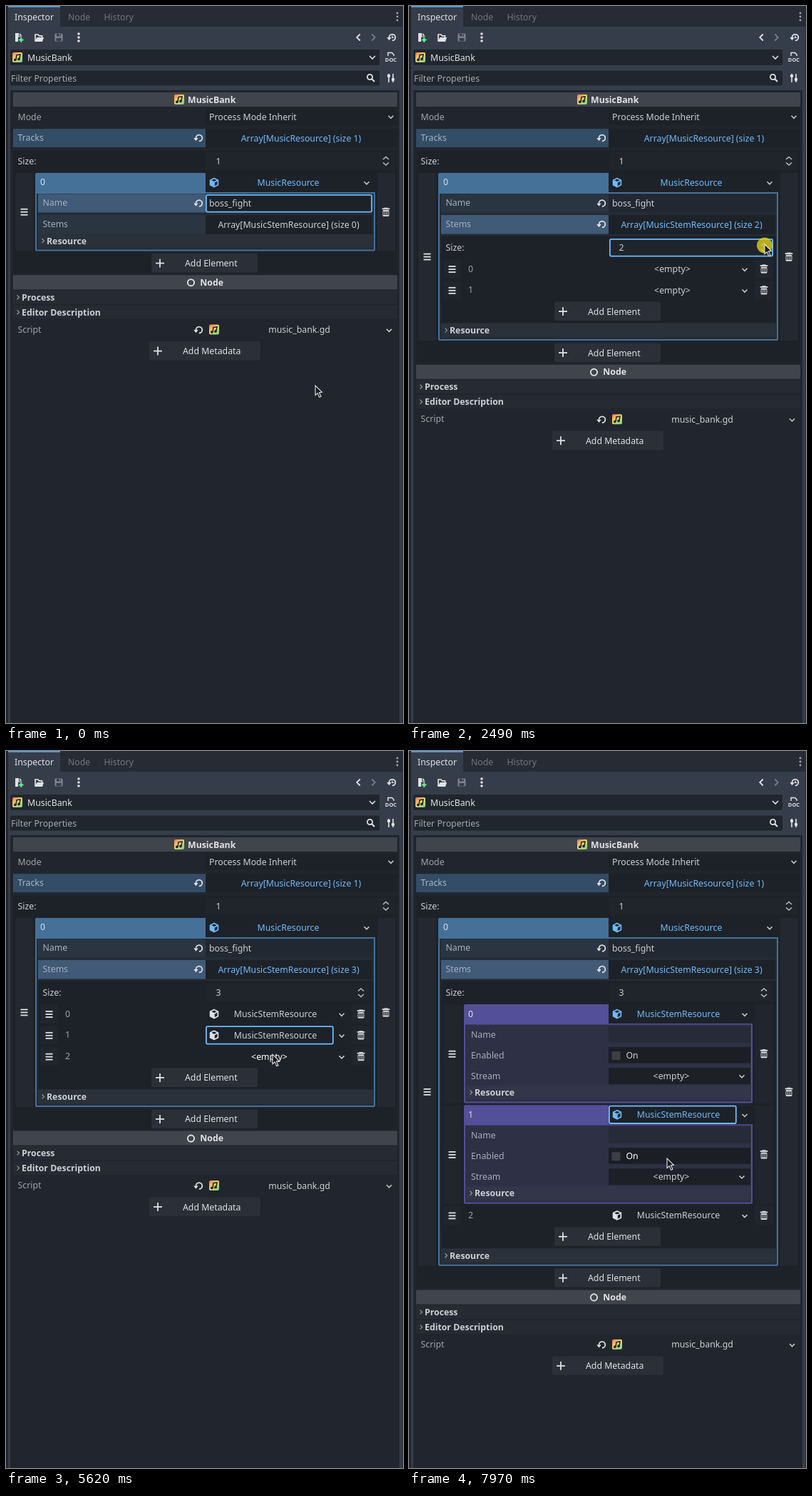
An HTML page with a canvas that plays this animation: 557x1005 px, repeating every 8 s.

```html
<!DOCTYPE html>
<html lang="en">
<head>
<meta charset="utf-8">
<title>Inspector</title>
<style>
html, body { margin: 0; width: 557px; height: 1005px; overflow: hidden; background: #21262e; }
canvas { display: block; width: 557px; height: 1005px; }
</style>
</head>
<body>
<canvas id="stage"></canvas>
<script>
const W = 557, H = 1005, LOOP = 8000;
const canvas = document.getElementById('stage');
const ratio = window.devicePixelRatio || 1;
canvas.width = W * ratio;
canvas.height = H * ratio;
const c = canvas.getContext('2d');

const FONT = '12.3px "Noto Sans", "Open Sans", sans-serif';
const ACCENT = '#70bafa', LIGHT = '#e0e1e3', TEXT = '#cdcfd2', DIM = '#9fa3aa', FAINT = '#70767f';
const BASE = '#363d4a', LIST = '#21262e', DARK = '#1d2229', FIELD = '#20242b';

// Cursor path: time, x, y
const PATH = [
  [0, 434, 532], [260, 434, 532], [540, 425, 312], [1240, 425, 312], [1310, 441, 328],
  [1930, 499, 334], [3120, 499, 334], [3350, 385, 370], [3480, 385, 370], [3580, 385, 393],
  [3840, 385, 393], [4380, 384, 400], [4500, 381, 405], [4600, 381, 405], [5060, 374, 424],
  [5450, 374, 424], [5610, 374, 425], [5730, 372, 434], [5820, 372, 434], [6100, 372, 453],
  [6280, 372, 453], [6900, 365, 378], [7060, 365, 378], [7650, 362, 513], [7860, 362, 513],
  [7970, 362, 571]
];
// Mouse button held: from, to
const PRESSES = [
  [770, 870], [2060, 2130], [2490, 2590], [2830, 2920], [3400, 3480], [3750, 3830], [4510, 4590],
  [5370, 5450], [5740, 5820], [6200, 6280], [6950, 7020], [7730, 7810]
];
const FOCUS = [[0, 'name'], [770, 'stems'], [2060, 'size'], [3400, 0], [4510, 1], [5740, 2], [6950, 0], [7730, 1]];
const POPUPS = [[3480, 3830], [4590, 5450], [5820, 6280]];
const GROW = [2060, 2490, 2830];
const EXPAND = [7020, 7810, Infinity];

function cursorAt(t) {
  let i = 0;
  while (i < PATH.length - 1 && PATH[i + 1][0] <= t) i++;
  const a = PATH[i], b = PATH[i + 1] || a;
  const p = b === a ? 0 : (t - a[0]) / (b[0] - a[0]);
  const e = p * p * (3 - 2 * p);
  return { x: a[1] + (b[1] - a[1]) * e, y: a[2] + (b[2] - a[2]) * e };
}
const within = (t, [from, to]) => t >= from && t < to;

function box(x1, y1, x2, y2, color, r = 0) {
  c.fillStyle = color;
  c.beginPath();
  c.roundRect(x1, y1, x2 - x1, y2 - y1, r);
  c.fill();
}
function frame(x1, y1, x2, y2, color = ACCENT, r = 2) {
  c.strokeStyle = color;
  c.lineWidth = 1.8;
  c.beginPath();
  c.roundRect(x1 + 0.9, y1 + 0.9, x2 - x1 - 1.8, y2 - y1 - 1.8, r);
  c.stroke();
}
function text(s, x, y, color = TEXT, align = 'left', bold = false) {
  c.font = (bold ? 'bold ' : '') + FONT;
  c.textAlign = align;
  c.fillStyle = color;
  c.fillText(s, x, y + 4.5);
}
function line(points, color, width = 1.6, close = false) {
  c.strokeStyle = color;
  c.lineWidth = width;
  c.beginPath();
  points.forEach(([x, y]) => c.lineTo(x, y));
  if (close) c.closePath();
  c.stroke();
}
function shape(points, color) {
  c.fillStyle = color;
  c.beginPath();
  points.forEach(([x, y]) => c.lineTo(x, y));
  c.fill();
}
function ring(x, y, r, color, width = 1.8, from = 0, to = Math.PI * 2) {
  c.strokeStyle = color;
  c.lineWidth = width;
  c.beginPath();
  c.arc(x, y, r, from, to);
  c.stroke();
}
function dot(x, y, r, color) {
  c.fillStyle = color;
  c.beginPath();
  c.arc(x, y, r, 0, Math.PI * 2);
  c.fill();
}

function down(x, y, r = 3.5, color = '#c5c7ca') {
  line([[x - r, y - r / 2], [x, y + r / 2], [x + r, y - r / 2]], color);
}
function side(x, y, r, dir, color, width = 1.5) {
  line([[x - dir * r / 2, y - r], [x + dir * r / 2, y], [x - dir * r / 2, y + r]], color, width);
}
function spin(x, y) {
  line([[x - 4, y - 2], [x, y - 5.5], [x + 4, y - 2]], '#b9bbbf');
  line([[x - 4, y + 2.5], [x, y + 6], [x + 4, y + 2.5]], '#b9bbbf');
}
function plus(x, y) {
  line([[x - 6, y], [x + 6, y]], LIGHT, 1.8);
  line([[x, y - 6], [x, y + 6]], LIGHT, 1.8);
}
function grip(x, y) {
  for (const d of [-4, 0, 4]) line([[x - 5, y + d], [x + 5, y + d]], LIGHT, 1.8);
}
function trash(x, y) {
  box(x - 2.6, y - 6.1, x + 2.6, y - 5, LIGHT);
  box(x - 5.3, y - 5.3, x + 5.3, y - 3.5, LIGHT);
  line([[x - 3.9, y - 1.8], [x + 3.9, y - 1.8]], LIGHT, 1.8);
  line([[x - 3.9, y + 5.2], [x + 3.9, y + 5.2]], LIGHT, 1.8);
  for (const d of [-3.9, -1.3, 1.3, 3.9]) line([[x + d, y - 2], [x + d, y + 5.5]], LIGHT, 0.95);
}
function revert(x, y) {
  ring(x + 0.9, y, 4.4, LIGHT, 1.8, Math.PI, Math.PI * 2.5);
  shape([[x - 6.7, y], [x - 0.3, y], [x - 3.5, y + 4.2]], LIGHT);
}
function cube(x, y, color) {
  const hex = [[x, y - 6], [x + 5.4, y - 3.3], [x + 5.4, y + 3.3], [x, y + 6], [x - 5.4, y + 3.3], [x - 5.4, y - 3.3]];
  shape([[x - 5.4, y - 3.3], [x, y - 0.5], [x, y + 6], [x - 5.4, y + 3.3]], color);
  line(hex, color, 1.7, true);
  line([[x - 5.4, y - 3.3], [x, y - 0.5], [x + 5.4, y - 3.3]], color, 1.6);
  line([[x, y - 0.5], [x, y + 6]], color, 1.5);
}
function note(x, y) {
  const g = c.createLinearGradient(x - 6, y - 7, x + 6, y + 7);
  g.addColorStop(0, '#f5785c');
  g.addColorStop(0.45, '#f6d860');
  g.addColorStop(1, '#6fd68c');
  box(x - 7, y - 7, x + 7, y + 7, g, 2);
  const ink = '#25282e';
  line([[x - 2, y + 3], [x - 1, y - 3.2], [x + 4, y - 4], [x + 3, y + 2]], ink, 1.6);
  dot(x - 3.2, y + 3.4, 1.9, ink);
  dot(x + 2, y + 2.4, 1.9, ink);
}
function section(name, x, y, left, right) {
  box(left, y - 9.5, right, y + 9.5, 'rgba(255, 255, 255, 0.025)');
  side(x, y, 3, 1, '#8f949b', 1.3);
  text(name, x + 5, y, TEXT, 'left', true);
}
function category(name, y) {
  box(10, y - 10, 549, y + 10, '#40444c', 1);
  text(name, 288.7, y, LIGHT, 'center', true);
}
function addButton(name, x1, x2, y) {
  box(x1, y - 13.5, x2, y + 13, '#2a2f38', 2);
  plus(x1 + 12, y);
  text(name, x1 + 47, y, LIGHT);
}

function header() {
  box(0, 0, W, H, '#262b34');
  box(3, 1, 76, 30, BASE);
  box(3, 0, 76, 1.8, '#62a1d8');
  box(3, 29, 556, H, BASE);
  box(0, 0, 2.5, H, '#20252d');
  text('Inspector', 12, 15, LIGHT);
  text('Node', 87, 15, FAINT);
  text('History', 137.5, 15, FAINT);
  for (const d of [-5, 0, 5]) {
    dot(549, 15 + d, 1.4, '#a4a8ae');
    dot(102, 44 + d, 1.8, LIGHT);
  }
  shape([[13, 38], [18, 38], [18, 42.5], [22.5, 42.5], [22.5, 50], [13, 50]], LIGHT);
  shape([[19, 38], [22.5, 41.5], [19, 41.5]], LIGHT);
  box(17, 43.5, 25, 51.5, BASE);
  line([[18, 47.5], [24.5, 47.5]], '#5fff97', 2);
  line([[21.2, 44.3], [21.2, 50.8]], '#5fff97', 2);
  line([[41, 49], [41, 40], [45, 40], [46.5, 41.8], [50.5, 41.8], [50.5, 44]], LIGHT, 1.7);
  shape([[43.5, 44], [53, 44], [51, 50], [40.2, 50]], LIGHT);
  box(68.5, 38.5, 79.5, 49.5, '#7d838d', 1.5);
  box(71, 39, 77, 42.5, BASE);
  box(70.5, 45, 77.5, 49, BASE);
  box(74.5, 39, 76, 41.5, '#7d838d');
  side(494.5, 44, 4.5, -1, LIGHT, 1.8);
  side(515.5, 44, 4.5, 1, '#777d87', 1.8);
  revert(541, 44);
  line([[541.9, 41.5], [541.9, 44.4], [544.2, 44.4]], LIGHT, 1.3);

  box(6, 61, 524, 83, '#21262e', 2);
  note(16, 72);
  text('MusicBank', 30, 72, LIGHT);
  down(514, 72, 4, LIGHT);
  line([[536, 70], [536, 65.5], [541.5, 65.5], [544, 68], [544, 70]], LIGHT, 1.5);
  c.font = 'bold 7.5px "Noto Sans", sans-serif';
  c.textAlign = 'center';
  c.fillStyle = LIGHT;
  c.fillText('DOC', 540, 78);
  box(6, 90.5, 524, 111.5, '#21262e', 2);
  text('Filter Properties', 7, 101, '#a6a9af');
  ring(510.5, 99.5, 3.6, LIGHT);
  line([[513, 102], [517, 106]], LIGHT, 2.2);
  line([[537, 95], [537, 107]], LIGHT, 1.6);
  line([[543, 95], [543, 107]], LIGHT, 1.6);
  box(535, 96, 539, 100, LIGHT, 1);
  box(541, 101, 545, 105, LIGHT, 1);

  box(6, 118, 552, H, LIST);
  category('MusicBank', 131);
  note(243, 131);
  text('Mode', 16.5, 155, DIM);
  box(280, 143.5, 549, 167, DARK);
  text('Process Mode Inherit', 285, 155.5);
  down(540, 155.5);
  box(10, 172.3, 280, 198, '#344d66');
  text('Tracks', 16.5, 184.5, '#a5b6c8');
  revert(270, 185);
  box(280, 172.3, 549, 198, DARK);
  text('Array[MusicResource] (size 1)', 414, 185, ACCENT, 'center');
}

function subResource(y) {
  const edge = '#534f98', tint = '#2e3045';
  box(77, y - 13.5, 482, y + 125, edge, 2);
  box(79, y + 15, 480, y + 123, tint);
  box(280, y - 13.5, 482, y + 13.5, DARK);
  box(280, y + 17.5, 479, y + 40, '#272a37');
  box(280, y + 46.5, 479, y + 69, '#1b1e24');
  box(280, y + 75.5, 479, y + 98.5, '#1d2027');
  text('Name', 87, y + 28.5, '#a9abb8');
  text('Enabled', 87, y + 57.5, '#a9abb8');
  text('Stream', 87, y + 86.5, '#a9abb8');
  box(284.5, y + 52.5, 296.5, y + 64.5, '#3c3f46', 1.5);
  text('<empty>', 368, y + 87, TEXT, 'center');
  down(467, y + 87.5);
  section('Resource', 87, y + 110, 80, 479);
}

function element(i, y, state) {
  const { open, filled, focus, mouse, popup } = state;
  const bottom = open ? y + 125 : y + 13;
  const mid = open ? y + 55.7 : y;
  box(48, y - 13, 73, bottom, '#21262e', 1);
  box(485, y - 13, 511, bottom, '#21262e', 1);
  grip(60.5, mid + 0.5);
  trash(498, mid);
  if (open) subResource(y);
  const hover = !popup && mouse.x > 280 && mouse.x < 459 && Math.abs(mouse.y - y) < 14;
  const ink = open ? ACCENT : hover ? '#ffffff' : TEXT;
  text(String(i), 83, y - 0.5, open ? LIGHT : DIM);
  if (filled) {
    cube(292, y, open ? ACCENT : LIGHT);
    text('MusicStemResource', 378, y, ink, 'center');
  } else {
    text('<empty>', 369.5, y, ink, 'center');
  }
  down(471, y + 1);
  if (focus) frame(280, y - 13, 459.7, y + 13.2);
  if (open) {
    const onHover = mouse.x > 280 && mouse.x < 479 && Math.abs(mouse.y - y - 58) < 12;
    text('On', 304.5, y + 58, onHover ? '#ffffff' : TEXT);
  }
}

function popupMenu(y, mouse) {
  box(289, y, 483, y + 87, '#3b424e');
  box(290, y + 1, 482, y + 86, '#242932');
  const rows = [['New MusicStemResource', 13], ['Quick Load...', 45], ['Load...', 70]];
  for (const [name, dy] of rows) {
    if (Math.abs(mouse.y - y - dy) < 11) box(292, y + dy - 11, 480, y + dy + 11, '#3c424c');
    text(name, 318, y + dy, LIGHT);
  }
  cube(304, y + 13, LIGHT);
  line([[294, y + 29], [478, y + 29]], '#454b55', 1);
  for (const dy of [45, 70]) {
    line([[299, y + dy + 5], [299, y + dy - 4], [303, y + dy - 4], [304.5, y + dy - 2], [308, y + dy - 2]], LIGHT);
    shape([[301.5, y + dy], [311, y + dy], [309, y + dy + 6], [298.5, y + dy + 6]], LIGHT);
  }
}

function pointer({ x, y }) {
  const arrow = [[0, 0], [0, 13.5], [3.2, 10.6], [5.7, 16.4], [8, 15.4], [5.5, 9.8], [9.4, 9.4]]
    .map(([dx, dy]) => [x + dx, y + dy]);
  shape(arrow, '#16191e');
  line(arrow, '#e8e8e8', 1.1, true);
}

function draw(t) {
  const mouse = cursorAt(t);
  const held = PRESSES.some(p => within(t, p));
  const focus = FOCUS.filter(f => f[0] <= t).pop()[1];
  const popup = POPUPS.findIndex(p => within(t, p));
  const open = t >= 870;
  const size = GROW.filter(g => g <= t).length;
  const rowY = [];
  let addY = 368.5;
  for (let i = 0; i < size; i++) {
    rowY.push(addY);
    addY += 29.8 + (t >= EXPAND[i] ? 111.4 : 0);
  }
  const resY = open ? addY + 26.5 : 329;
  const bottom = resY + 14.5, outerY = resY + 31.5, nodeY = outerY + 26.7;

  c.setTransform(ratio, 0, 0, ratio, 0, 0);
  header();

  box(10, 203, 549, outerY + 14, DARK);
  text('Size:', 16.5, 217, TEXT);
  box(280, 205, 545, 230, FIELD, 1);
  text('1', 294.5, 217);
  spin(533, 217);
  const mid = (234 + bottom) / 2;
  box(13, 234, 38, bottom, '#232831', 1);
  box(521, 234, 546, bottom, '#232831', 1);
  grip(25.5, mid);
  trash(533, mid);

  const blue = '#457199';
  box(41, 234, 518, bottom, blue, 2);
  box(280, 234, 518, 261, DARK);
  box(43, 263, 516, bottom - 2, '#252c36');
  text('0', 48, 246.5, LIGHT);
  cube(292, 247.5, ACCENT);
  text('MusicResource', 396, 247, ACCENT, 'center');
  down(506, 248);

  const plain = '#2a3542', active = '#405a77';
  box(45, 263.5, 280, 289.5, focus === 'name' ? active : plain);
  box(45, 293, 280, 319.5, open || focus === 'stems' ? active : plain);
  text('Name', 51.5, 275.5, '#a6b0bb');
  revert(270, 276.5);
  text('Stems', 51.5, 305.5, '#a6b0bb');
  if (size > 0) revert(270, 306);
  box(280, 264, 514, 289, focus === 'name' ? DARK : '#222831');
  text('boss_fight', 285, 276, TEXT);
  box(280, 293, 514, 320, DARK);
  const stemsHover = mouse.x < 514 && Math.abs(mouse.y - 306) < 13;
  text(`Array[MusicStemResource] (size ${size})`, 396.5, 306, open ? ACCENT : stemsHover ? '#ffffff' : TEXT, 'center');
  if (focus === 'name') frame(280, 264, 514, 289.5);
  if (focus === 'stems') frame(280, 293, 514, 319.5);

  if (open) {
    box(45, 322, 515, addY + 16, DARK);
    text('Size:', 51.5, 338.5);
    box(281, 326, 510, 351, FIELD, 1);
    text(String(size), 294.5, 338);
    spin(498, 338.5);
    if (focus === 'size') frame(281, 326, 511, 351.5);
    rowY.forEach((y, i) => element(i, y, {
      open: t >= EXPAND[i],
      filled: t >= POPUPS[i][1],
      focus: focus === i,
      mouse,
      popup: popup >= 0
    }));
    addButton('Add Element', 204, 353, addY);
  }
  section('Resource', 52, resY, 45, 515);
  addButton('Add Element', 204, 353, outerY);

  category('Node', nodeY);
  ring(259.5, nodeY + 0.5, 4.6, LIGHT, 1.9);
  section('Process', 17, nodeY + 21, 10, 549);
  section('Editor Description', 17, nodeY + 42, 10, 549);
  const scriptY = nodeY + 66.4;
  text('Script', 16.5, scriptY - 0.5, DIM);
  revert(270, scriptY + 0.5);
  note(292, scriptY);
  text('music_bank.gd', 411.5, scriptY, TEXT, 'center');
  down(537.5, scriptY + 1);
  addButton('Add Metadata', 201, 357, nodeY + 96.4);

  if (popup >= 0) popupMenu(rowY[popup] + 13.5, mouse);
  if (held) dot(mouse.x, mouse.y + 1.5, 11, 'rgba(222, 208, 24, 0.8)');
  pointer(mouse);
}

const start = performance.now();
function tick() {
  draw((performance.now() - start) % LOOP);
  requestAnimationFrame(tick);
}
tick();
</script>
</body>
</html>
```
